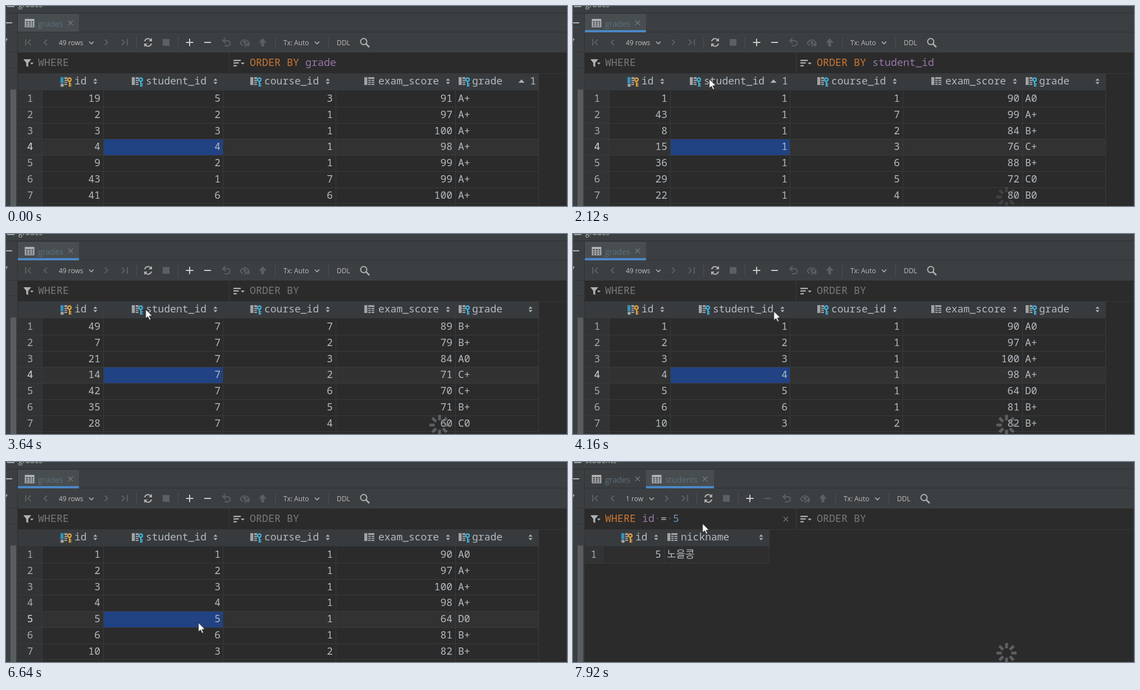
An HTML page for the animation above (8 s loop, 999 by 357 pixels).

```html
<!DOCTYPE html>
<html lang="ko">
<head>
<meta charset="utf-8">
<title>Grades table</title>
<style>
html, body { margin: 0; width: 100%; height: 100%; overflow: hidden; background: #2b2b2b; }
svg { display: block; width: 999px; height: 357px; }
text { white-space: pre; }
.m { font: 18px "Noto Sans Mono", "Noto Sans CJK KR", "DejaVu Sans Mono", monospace; fill: #b3bbc2; }
.e { font-size: 18.33px; }
.u { font: 12px "Open Sans", "Noto Sans", sans-serif; fill: #bbbdbf; }
.tab { font-size: 14.3px; fill: #5b717d; }
.end { text-anchor: end; }
.mid { text-anchor: middle; fill: #a5abb0; }
.hint { fill: #777a7c; }
.kw { fill: #cc7832; }
.col { fill: #9876aa; }
.num { fill: #6897bb; }
.dot { fill: #55585a; }
.i { fill: none; stroke: #afb1b3; stroke-width: 2; }
.off { stroke: #5c6062; }

.anim { animation: 8s step-end infinite; }
.head1 { animation-name: head1; }
.head2 { animation-name: head2; }
.head3 { animation-name: head3; }
.head4 { animation-name: head4; }
.data1 { animation-name: data1; }
.data2 { animation-name: data2; }
.data3 { animation-name: data3; }
.data4 { animation-name: data4; }
.row4 { animation-name: row4; }
.row5 { animation-name: row5; }
.focus { animation-name: focus; }
.first { animation-name: first; }
.second { animation-name: second; }
.seen { animation-name: seen; }
@keyframes head1 { 0% { opacity: 1 } 21%, 100% { opacity: 0 } }
@keyframes head2 { 0% { opacity: 0 } 21% { opacity: 1 } 29%, 100% { opacity: 0 } }
@keyframes head3 { 0% { opacity: 0 } 29% { opacity: 1 } 43%, 100% { opacity: 0 } }
@keyframes head4 { 0% { opacity: 0 } 43%, 100% { opacity: 1 } }
@keyframes data1 { 0% { opacity: 1 } 26.5%, 100% { opacity: 0 } }
@keyframes data2 { 0% { opacity: 0 } 26.5% { opacity: 1 } 33%, 100% { opacity: 0 } }
@keyframes data3 { 0% { opacity: 0 } 33% { opacity: 1 } 49.5%, 100% { opacity: 0 } }
@keyframes data4 { 0% { opacity: 0 } 49.5%, 100% { opacity: 1 } }
@keyframes row4 { 0% { opacity: 1 } 73.5%, 100% { opacity: 0 } }
@keyframes row5 { 0% { opacity: 0 } 73.5%, 100% { opacity: 1 } }
@keyframes focus { 0% { opacity: 0 } 21%, 100% { opacity: 1 } }
@keyframes first { 0% { opacity: 1 } 85%, 100% { opacity: 0 } }
@keyframes second { 0% { opacity: 0 } 85%, 100% { opacity: 1 } }
@keyframes seen { 0% { opacity: 0 } 3%, 100% { opacity: 1 } }

.spin { animation: spin 8s linear infinite; }
@keyframes spin {
  0%, 25.5% { opacity: 0 }
  28%, 60% { opacity: .62 }
  69.5% { opacity: .36 }
  78%, 86% { opacity: 0 }
  90%, 100% { opacity: .62 }
}
.cursor { animation: move 8s ease-in-out infinite; }
@keyframes move {
  0%, 3% { transform: translate(463px, 302px) }
  13%, 14% { transform: translate(351px, 177px) }
  18%, 24% { transform: translate(244.5px, 129.5px) }
  34.5%, 43% { transform: translate(227.5px, 133.5px) }
  52% { transform: translate(357.5px, 137.5px) }
  59.5% { transform: translate(223px, 133px) }
  69.5% { transform: translate(325.5px, 264.5px) }
  76%, 78% { transform: translate(337px, 274px) }
  78.5%, 84% { transform: translate(342.5px, 286.5px) }
  92%, 93.5% { transform: translate(247px, 117px) }
  96% { transform: translate(204px, 112px) }
  99%, 100% { transform: translate(230.5px, 109.5px) }
}
</style>
</head>
<body>
<svg id="stage" viewBox="0 0 999 357"></svg>
<script>
const rect = (x, y, w, h, fill) => `<rect x="${x}" y="${y}" width="${w}" height="${h}" fill="${fill}"/>`;
const text = (x, y, s, cls = 'm') => `<text x="${x}" y="${y}" class="${cls}">${s}</text>`;
const path = (d, cls = 'i') => `<path d="${d}" class="${cls}"/>`;
const fill = (d, color = '#afb1b3') => `<path d="${d}" fill="${color}"/>`;
const at = (x, y, s) => `<g transform="translate(${x} ${y})">${s}</g>`;
const anim = (name, s) => `<g class="anim ${name}">${s}</g>`;
const span = (cls, s) => `<tspan class="${cls}">${s}</tspan>`;

const BG = '#2b2b2b', PANEL = '#3c3f41', LINE = '#393b3c', TAB = '#484d50';
const lineY = k => Math.round(151 + 28.75 * k);
const baseY = k => Math.round(171 + 28.75 * k);

// Icons
const tableIcon = fill('M0 0h17v15h-17zM2 4v2.5h3.5v-2.5zM7 4v2.5h3.5v-2.5zM12 4v2.5h3v-2.5zM2 8v2h3.5v-2zM7 8v2h3.5v-2zM12 8v2h3v-2zM2 11.500v2h3.500v-2zM7 11.500v2h3.500v-2zM12 11.500v2h3v-2z');
const cross = (x, y) => path(`M${x - 4} ${y - 4}l8 8m0 -8l-8 8`, 'i off" style="stroke:#74797c;stroke-width:1.2');
const key = color => `<circle cx="16" cy="5.500" r="3" fill="none" stroke="${color}" stroke-width="2.4"/>` +
  fill('M14.900 8h2.300v10h-2.300zM17 12h2.500v2h-2.500zM17 15.500h2.500v2h-2.500z', color);

function columnIcon(x, kind) {
  const w = kind ? 12 : 18;
  let s = rect(0, 1, 5.5, 14, kind === 'pk' ? '#3a8fb7' : '#9fa3a6') +
    fill(`M7 1h${w - 7}v3.500h-${w - 7}zM7 6h${w - 7}v2h-${w - 7}zM7 9.500h${w - 7}v2h-${w - 7}zM7 13h${w - 7}v2h-${w - 7}z`, '#9fa3a6');
  if (!kind) s += rect(11.5, 4, 1.2, 11, '#383b3d');
  if (kind === 'pk') s += '<circle cx="3" cy="15.500" r="3.500" fill="#9fa3a6" stroke="#383b3d"/>';
  if (kind) s += key(kind === 'pk' ? '#dfa03c' : '#40b0d8');
  return at(x, 126, s);
}
const sorter = x => fill(`M${x - 3.5} 133.200l3.500 -4 3.500 4zM${x - 3.5} 135.800l3.500 4 3.500 -4z`);
const sorted = (x, up) => fill(up ? `M${x - 5.5} 137h11l-5.500 -6z` : `M${x - 5.5} 132h11l-5.500 6z`) + text(x + 15, 140, '1');
const column = (x, name, kind) => columnIcon(x, kind) + text(x + 25, 140, name);

// Window frame
function frame() {
  let s = rect(0, 0, 999, 357, BG) + rect(0, 0, 999, 83, PANEL) + rect(0, 12, 999, 1, '#2d2f31') +
    rect(0, 46, 999, 1, '#303234') + rect(0, 13, 20, 344, PANEL) + rect(20, 13, 1, 344, '#2f3133') +
    rect(0, 82, 20, 1, '#303234') + rect(0, 110, 20, 1, '#303234') + rect(8, 149, 10, 208, '#5a5d5f');
  s += rect(0, 29, 11, 2, '#afb1b3') + path('M-2 65l4 -7', 'i') + rect(2, 0, 13, 2, '#9fa3a6');
  s += rect(21, 120, 978, 1, '#343638') + rect(397, 83, 1, 38, LINE) + rect(998, 0, 1, 357, '#3d4042');
  s += fill('M31 95h14l-5.500 6.500v7.500l-3.500 -2v-5.500z') + fill('M43 101h6l-3 3.500z');
  s += fill('M405 96h13v2.200h-13zM405 100.500h9.500v2.200h-9.500zM405 105.500h6v2.200h-6zM418 101h7l-3.500 3.500z');
  return s;
}

const chevron = x => path(`M${x - 4} 63.500l4 4 4 -4`, 'i" style="stroke-width:1.6');
const separator = x => rect(x, 55, 1, 22, '#4d5153');

function toolbar(rows, single) {
  let s = path('M35 59v12m9 -11l-5 5 5 5M73 60l-5 5 5 5', 'i off') + text(94, 70, rows, 'u');
  let r = chevron(152) + path('M176 60l5 5 -5 5M206 60l5 5 -5 5M216 59v12', 'i off') + separator(232) +
    path('M247 63a6.300 6.300 0 0 1 11 -2.500M259 67a6.300 6.300 0 0 1 -11 2.500') +
    fill('M260 57v6h-6zM246 73v-6h6z') + rect(279, 59, 12, 12, '#5c6062') + separator(306) +
    path('M320.500 65h13M327 58.500v13', 'i" style="stroke:#c8cacc') +
    path('M353 65h12', single ? 'i off' : 'i" style="stroke:#c8cacc') +
    path('M387 62h7.500a4.500 4.500 0 0 1 0 9h-5M391 57.500l-5 4.500 5 4.500', 'i off') +
    path('M417 66q8 -11 16 0q-2 3 -4 3.500M417 66q2 3.500 5 4', 'i off') +
    '<circle cx="425" cy="65" r="2.500" fill="#5c6062"/>' +
    path('M426 73v-4h7m-3 -3l3 3 -3 3', 'i off') +
    fill('M457 57.500l7 8h-4.500v6.500h-5v-6.500h-4.500z', '#5c6062') + separator(479) +
    text(494, 70, 'Tx: Auto', 'u') + chevron(554) + separator(574) + text(589, 70, 'DDL', 'u') +
    '<circle cx="637" cy="63.500" r="5.500" class="i"/>' + path('M641 67.500l6 6', 'i" style="stroke-width:2.600');
  return s + at(single ? -12 : 0, 0, r);
}

const tab = (x, name, close) => at(x, 23, tableIcon) + text(x + 23.5, 36.5, name, 'u tab') + cross(close, 30);
const title = name => text(22, 1.5, name, 'u" style="font-size:13.700px');

// Grades table
const edges = [64, 173, 386, 587, 800, 948];
const ends = [168, 382, 582, 795];

function grid(xs, rows) {
  const left = 21, right = xs[xs.length - 1], bottom = rows === 1 ? 180 : 357;
  let s = rect(left, 121, right - left, 30, '#383b3d') + rect(left, 151, xs[0] - left, bottom - 151, '#313335');
  s += rect(left, 150, right - left, 1, '#303234');
  for (let k = 1; k <= rows; k++) s += rect(left, lineY(k), right - left, 1, LINE);
  for (const x of xs) s += rect(x, 121, 1, bottom - 121, LINE);
  return s;
}

function selection(row, name) {
  const y = lineY(row - 1) + 1, h = lineY(row) - y;
  return anim(name, rect(65, y, 883, h, '#323232') + rect(174, y, 212, h, '#214283') +
    [173, 386, 587, 800].map(x => rect(x, y, 1, h, LINE)).join('') +
    text(43, baseY(row - 1), row, 'm mid" style="fill:#c3c8cc'));
}

const records = lines => lines.split('|').map((line, k) => line.split(' ').map((v, c) =>
  c < 4 ? text(ends[c], baseY(k), v, 'm end') : text(805, baseY(k), v)).join('')).join('');

const orders = {
  head1: span('kw', 'ORDER BY ') + span('col', 'grade'),
  head2: span('kw', 'ORDER BY ') + span('col', 'student_id'),
  head3: span('kw', 'ORDER BY ') + span('col', 'student_id') + span('dot', '·') + span('kw', 'DESC'),
  head4: span('hint', 'ORDER BY')
};

function header(name) {
  const byStudent = name === 'head2' || name === 'head3';
  return anim(name, text(434, 107, orders[name], 'm e') +
    (byStudent ? column(208, 'student_id', 'fk') + sorted(357, name === 'head2')
               : column(224, 'student_id', 'fk') + sorter(373)) +
    (name === 'head1' ? sorted(918, true) : sorter(934)));
}

function gradesView() {
  let s = title('grades') + rect(21, 14, 109, 32, TAB) + tab(33.5, 'grades', 115) +
    anim('focus', rect(21, 43, 109, 4, '#4a88c7')) + toolbar('49 rows') +
    text(57, 107, 'WHERE', 'm e hint') + grid(edges, 7);
  for (let k = 0; k < 7; k++) s += text(43, baseY(k), k + 1, 'm mid');
  s += selection(4, 'row4') + selection(5, 'row5');
  s += column(97, 'id', 'pk') + sorter(159) + column(435, 'course_id', 'fk') + sorter(573) +
    column(638, 'exam_score') + sorter(787) + columnIcon(806, 'fk') + text(830, 140, 'grade');
  s += Object.keys(orders).map(header).join('');
  s += anim('data1', records('19 5 3 91 A+|2 2 1 97 A+|3 3 1 100 A+|4 4 1 98 A+|9 2 1 99 A+|43 1 7 99 A+|41 6 6 100 A+'));
  s += anim('data2', records('1 1 1 90 A0|43 1 7 99 A+|8 1 2 84 B+|15 1 3 76 C+|36 1 6 88 B+|29 1 5 72 C0|22 1 4 80 B0'));
  s += anim('data3', records('49 7 7 89 B+|7 7 2 79 B+|21 7 3 84 A0|14 7 2 71 C+|42 7 6 70 C+|35 7 5 71 B+|28 7 4 60 C0'));
  s += anim('data4', records('1 1 1 90 A0|2 2 1 97 A+|3 3 1 100 A+|4 4 1 98 A+|5 5 1 64 D0|6 6 1 81 B+|10 3 2 82 B+'));
  return anim('first', s);
}

function studentsView() {
  const where = span('kw', 'WHERE ') + span('col', 'id') + span('dot', '·') + '=' + span('dot', '·') + span('num', '5');
  return anim('second', title('students') + tab(33.5, 'grades', 115) + rect(130, 14, 121, 32, TAB) +
    tab(140.5, 'students', 235) + rect(130, 43, 121, 4, '#4a88c7') + toolbar('1 row', true) +
    text(57, 107, where, 'm e') + cross(379, 102) + text(434, 107, 'ORDER BY', 'm e hint') +
    grid([53, 162, 349], 1) + rect(54, 152, 295, 28, '#2e2e2e') + rect(162, 151, 1, 29, LINE) +
    column(86, 'id', 'pk') + sorter(148) + columnIcon(168) + text(192, 140, 'nickname') + sorter(335) +
    text(37, 171, '1', 'm mid') + text(157, 171, '5', 'm end') + text(167, 171, '노을콩'));
}

function spinner() {
  let s = '';
  for (let k = 0; k < 8; k++)
    s += `<rect x="-2.500" y="-18" width="5" height="9.500" fill="#7c8082" transform="rotate(${k * 45})"/>`;
  return at(772, 341, `<g class="spin">${s}</g>`);
}

const cursor = '<g class="cursor">' + anim('seen',
  '<path d="M0 0v17l3.900 -3.700 2.900 6.200 2.600 -1.200 -2.800 -6h5.400z" fill="#fff" stroke="#111" stroke-width="1"/>') + '</g>';

document.getElementById('stage').innerHTML = frame() + gradesView() + studentsView() + spinner() + cursor;
</script>
</body>
</html>
```
